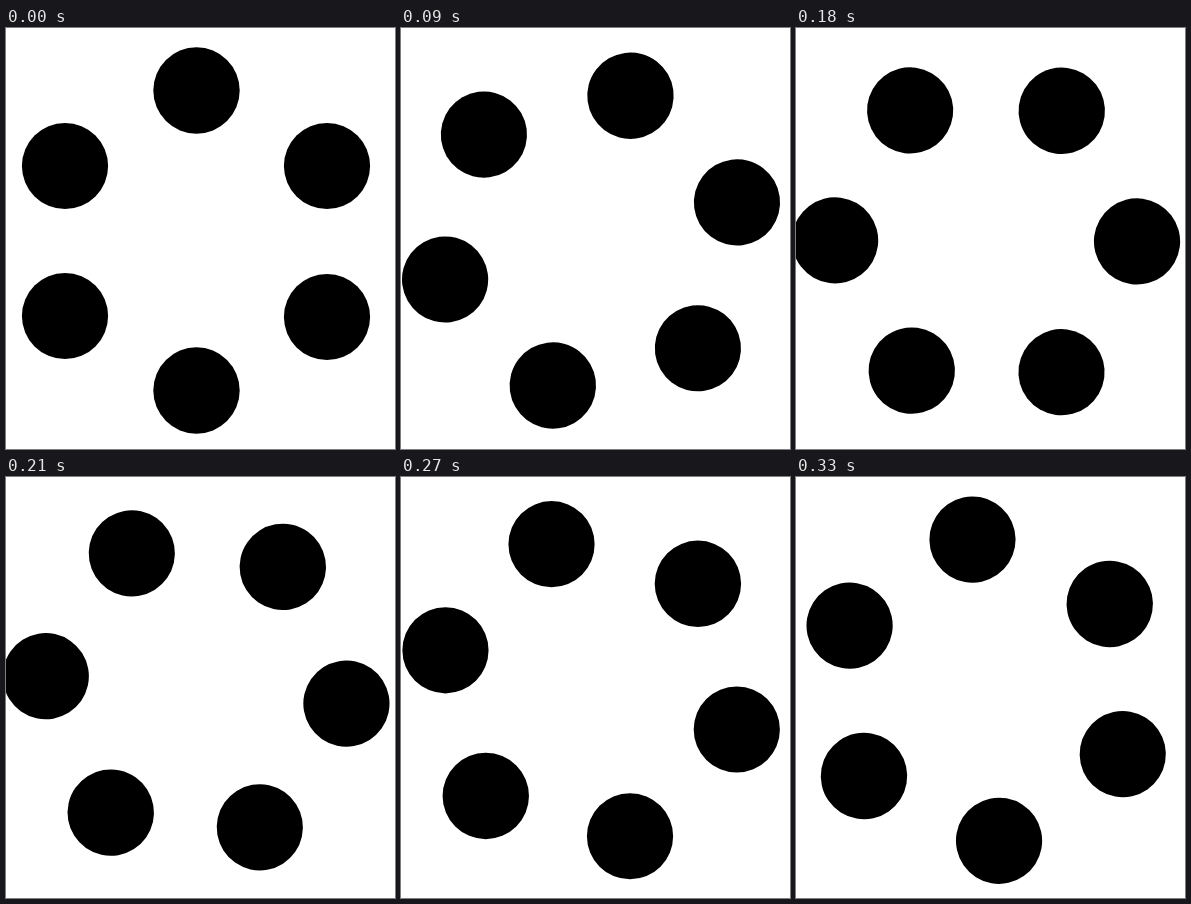
These frames come from a looping animation (389x421 px, 360 ms). An HTML page:

```html
<!DOCTYPE html>
<html lang="en">
<head>
<meta charset="utf-8">
<title>Rotating dots</title>
<style>
  html, body { margin: 0; width: 100%; height: 100%; overflow: hidden; background: #fff; }
  svg { display: block; width: 389px; height: 421px; }
</style>
</head>
<body>
<svg viewBox="0 0 389 421">
  <g id="ring">
    <circle cx="190.5" cy="62.5" r="43.2"/>
    <circle cx="321" cy="138" r="43.1"/>
    <circle cx="321" cy="289" r="43.1"/>
    <circle cx="190.5" cy="362.5" r="43.2"/>
    <circle cx="59" cy="288" r="43.1"/>
    <circle cx="59" cy="138" r="43.1"/>
  </g>
</svg>
<script>
  const LOOP = 360, STEP = 30, TURN = 5;
  const ring = document.getElementById('ring');
  const start = performance.now();

  function draw(ms) {
    const step = Math.floor((ms % LOOP) / STEP);
    ring.setAttribute('transform', `rotate(${step * TURN} 190.2 213.1)`);
  }

  function tick() {
    draw(performance.now() - start);
    requestAnimationFrame(tick);
  }

  draw(0);
  requestAnimationFrame(tick);
</script>
</body>
</html>
```
